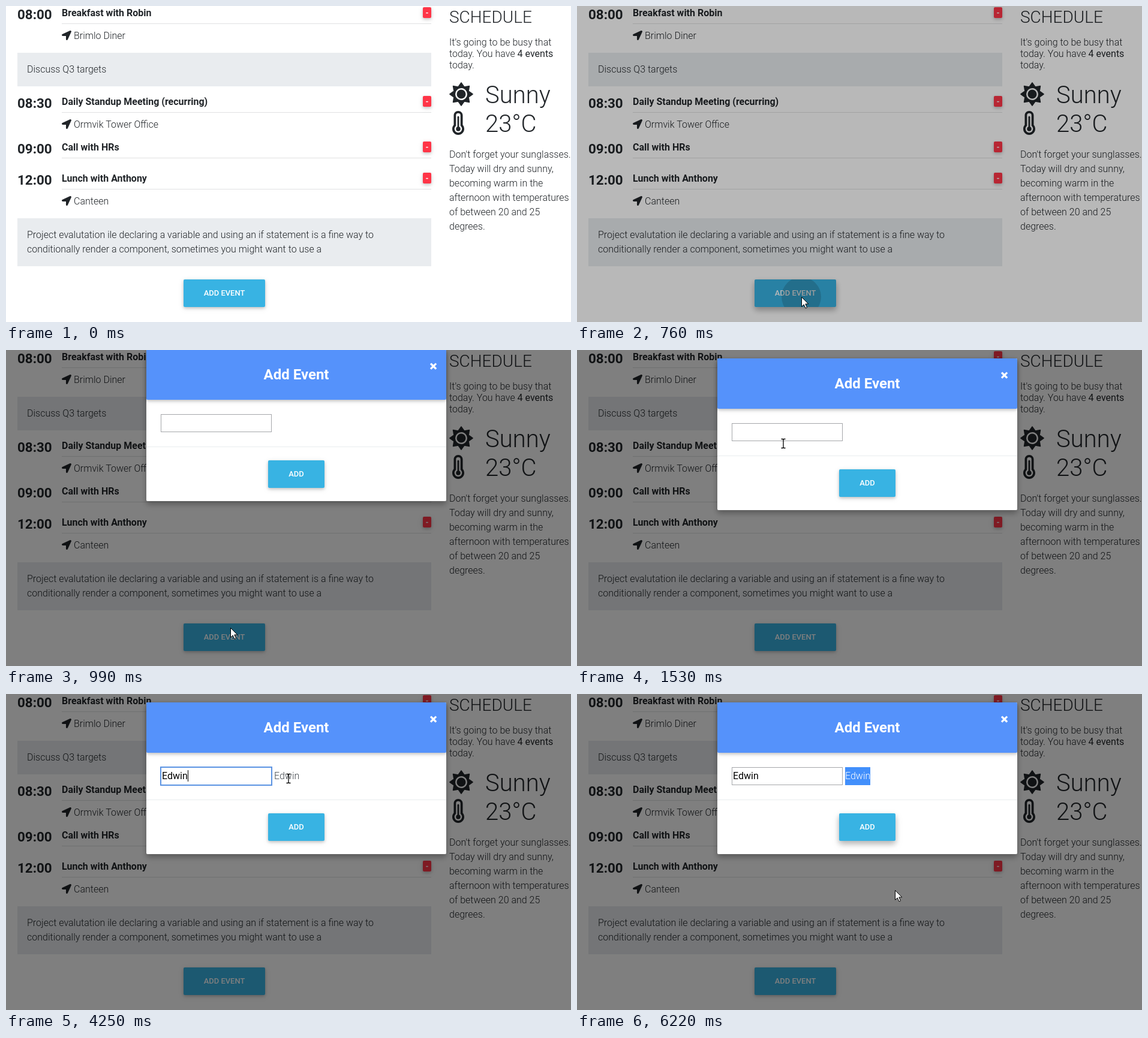
Write an HTML page that moves like this. It is 942 by 527 pixels and loops after 6450 ms.

```html
<!DOCTYPE html>
<html lang="en">
<head>
<meta charset="utf-8">
<title>Add event</title>
<style>
  html, body { margin: 0; width: 100%; height: 100%; overflow: hidden; background: #fff; }
  svg { display: block; width: 100%; height: 100%; }
  text { font: 300 16px Roboto, sans-serif; fill: #212529; }
  .bold { font-weight: 700; }
  .time { font-weight: 700; font-size: 22.4px; }
  .head { font-size: 28px; }
  .big { font-size: 40px; }
  .normal, .typed { font-weight: 400; }
  .typed { fill: #000; }
  .btn { font-weight: 500; font-size: 12.96px; fill: #fff; text-anchor: middle; }
  .title { font-weight: 700; font-size: 24px; fill: #fff; text-anchor: middle; }
  .minus { font-weight: 700; font-size: 13px; fill: #fff; text-anchor: middle; }
  .echo { fill: #40464c; }
</style>
</head>
<body>
<svg id="stage" viewBox="0 0 942 527" xmlns="http://www.w3.org/2000/svg">
  <defs>
    <filter id="low" x="-100%" y="-100%" width="300%" height="300%">
      <feDropShadow dx="0" dy="2" stdDeviation="2.5" flood-opacity=".18"/>
      <feDropShadow dx="0" dy="2" stdDeviation="4" flood-opacity=".1"/>
    </filter>
    <filter id="high" x="-50%" y="-100%" width="200%" height="300%">
      <feDropShadow dx="0" dy="5" stdDeviation="5" flood-opacity=".2"/>
      <feDropShadow dx="0" dy="4" stdDeviation="6" flood-opacity=".13"/>
    </filter>
    <clipPath id="addClip"><rect x="296" y="456" width="136" height="46" rx="2"/></clipPath>
    <path id="pin" d="M444.5 3.5L28.7 195.4c-48 22.4-32 92.8 19.2 92.8h175.9v175.9c0 51.2 70.4 67.2 92.8 19.2L508.5 67.5C524.5 29.1 482.9-12.5 444.5 3.5z" fill="#212529" transform="scale(.03125)"/>
  </defs>

  <g id="page">
    <rect width="942" height="527" fill="#fff"/>
    <rect x="19" y="78" width="690" height="56" fill="#e9ecef"/>
    <rect x="19" y="354" width="690" height="80" fill="#e9ecef"/>
    <rect id="openBtn" x="296" y="456" width="136" height="46" rx="2" fill="#39b3e3"/>
    <text class="btn" x="364" y="483">ADD EVENT</text>
    <circle id="ripple" cx="374" cy="485" clip-path="url(#addClip)"/>

    <g id="sun" transform="translate(759 147)"></g>
    <g transform="translate(744 175) scale(.078125)" fill="#212529" stroke-linecap="round">
      <path d="M224 96c0-53-43-96-96-96S32 43 32 96v203C12 322 0 352 0 384c0 71 57 128 128 128s128-57 128-128c0-32-12-62-32-85z"/>
      <path d="M128 96V384" stroke="#fff" stroke-width="96"/>
      <circle cx="128" cy="384" r="80" fill="#fff"/>
      <circle cx="128" cy="384" r="48"/>
      <path d="M128 130V384" stroke="#212529" stroke-width="36"/>
    </g>
  </g>

  <rect id="dim" width="942" height="527"/>

  <g id="modal">
    <rect x="234" y="14" width="500" height="253" rx="2" fill="#fff" filter="url(#high)"/>
    <rect x="234" y="14" width="500" height="84" rx="2" fill="#5592fb" filter="url(#low)"/>
    <text class="title" x="484" y="64">Add Event</text>
    <path d="M708.8 38.3l7.6 7.6m0-7.6l-7.6 7.6" stroke="#fff" stroke-width="3.6" stroke-linecap="square" transform="translate(712.6 42.1) scale(.9) translate(-712.6 -42.1)"/>
    <rect x="258.5" y="122.5" width="184" height="29" fill="#fff" stroke="#a5a7aa"/>
    <rect id="ring" x="258" y="122" width="185" height="30" fill="none" stroke="#5b93e2" stroke-width="2"/>
    <text id="typed" class="typed" x="260" y="142"></text>
    <rect id="caret" y="127" width="1" height="19"/>
    <rect id="mark" x="447" y="122" height="30" fill="#428ffb"/>
    <text class="echo" x="447" y="142" id="echo"><tspan id="picked" fill="#fff"></tspan><tspan id="rest"></tspan></text>
    <rect x="234" y="176" width="500" height="1" fill="#e9ecef"/>
    <rect id="addBtn" x="437" y="199" width="94" height="46" rx="2" fill="#39b3e3"/>
    <text class="btn" x="484" y="226">ADD</text>
  </g>

  <path id="arrow" d="M.5 .5V16.4l3.7-3.5 2.8 6.1 2.5-1.1-2.7-6h5z" fill="#fff" stroke="#000" stroke-width="1"/>
  <path id="beam" d="M-3.5 -7.5h2.5l1 1 1-1h2.5M0 -6.5V6.5M-3.5 7.5h2.5l1-1 1 1h2.5" fill="none" stroke="#000" stroke-width="1.3"/>
</svg>

<script>
const LOOP = 6450;
const NAME = "Edwin";
const NS = "http://www.w3.org/2000/svg";
const el = id => document.getElementById(id);
const page = el("page");

function add(parent, tag, attrs, content) {
  const node = document.createElementNS(NS, tag);
  for (const key in attrs) node.setAttribute(key, attrs[key]);
  if (content) node.textContent = content;
  parent.appendChild(node);
  return node;
}
const label = (x, y, content, cls = "") => add(page, "text", { x, y, class: cls }, content);
const lines = (x, y, gap, list) => list.forEach((s, i) => label(x, y + i * gap, s));

// Event list: title baseline, time, title, place
[
  [17, "08:00", "Breakfast with Robin", "Brimlo Diner"],
  [165, "08:30", "Daily Standup Meeting (recurring)", "Ormvik Tower Office"],
  [241, "09:00", "Call with HRs", ""],
  [293, "12:00", "Lunch with Anthony", "Canteen"]
].forEach(([y, time, title, place]) => {
  label(19, y + 5, time, "time");
  label(93, y, title, "bold");
  add(page, "rect", { x: 93, y: y + 12, width: 616, height: 1, fill: "#e0e1e2" });
  add(page, "rect", { x: 695, y: y - 15, width: 14, height: 18, rx: 2, fill: "#ff3547", filter: "url(#low)" });
  label(702, y - 1.5, "-", "minus");
  if (place) {
    add(page, "use", { href: "#pin", x: 0, y: 0, transform: `translate(93 ${y + 24})` });
    label(113, y + 38, place);
  }
});

lines(35, 111, 24, ["Discuss Q3 targets"]);
lines(35, 387, 24, [
  "Project evalutation ile declaring a variable and using an if statement is a fine way to",
  "conditionally render a component, sometimes you might want to use a"
]);
label(739, 28, "SCHEDULE", "head");
lines(739, 66, 19, ["It's going to be busy that", "today. You have ", "today."]);
const busy = [...page.querySelectorAll("text")].find(n => n.textContent.startsWith("today. You"));
busy.style.whiteSpace = "pre";
add(busy, "tspan", { class: "normal" }, "4 events");
label(799, 162, "Sunny", "big");
label(799, 210, "23°C", "big");
lines(739, 253, 24, [
  "Don't forget your sunglasses.", "Today will dry and sunny,", "becoming warm in the",
  "afternoon with temperatures", "of between 20 and 25", "degrees."
]);

const rays = Array.from({ length: 16 }, (_, i) => {
  const r = i % 2 ? 13 : 19, a = i * Math.PI / 8;
  return `${r * Math.cos(a)},${r * Math.sin(a)}`;
}).join(" ");
add(el("sun"), "polygon", { points: rays, fill: "#212529", stroke: "#212529", "stroke-width": 1.6, "stroke-linejoin": "round" });
add(el("sun"), "circle", { r: 10, fill: "#fff" });
add(el("sun"), "circle", { r: 7.5, fill: "#212529" });

// The picture only changes at these moments
const run = (from, to, n) => Array.from({ length: n }, (_, i) =>
  Math.round((from + (to - from) * i / (n - 1)) / 10) * 10);
const keys = [2450, 2620, 2770, 2920, 3090];
const cuts = [0, ...run(150, 760, 9), ...run(840, 1450, 9), ...run(1530, 1840, 5), 2220, ...keys,
  3550, ...run(3870, 4100, 4), ...run(4250, 4410, 3), ...run(4560, 5100, 8), 5250, 6220];

// Pointer path: time, x, y
const path = [
  [150, 500, 524], [600, 378, 488], [760, 374, 485], [840, 374, 465], [990, 374, 463],
  [1070, 372, 440], [1380, 346, 180], [1450, 344, 160], [1840, 342, 139], [3790, 342, 139],
  [4100, 492, 142], [4250, 471, 141], [4410, 448, 141], [4560, 447, 141], [4950, 505, 138],
  [5020, 508, 134], [5100, 492, 123], [5250, 504, 128], [6220, 530, 327]
];

const clamp = v => Math.min(1, Math.max(0, v));
const within = (t, a, b) => t >= a && t < b;
const set = (id, attrs) => { for (const k in attrs) el(id).setAttribute(k, attrs[k]); };
const show = (id, on) => set(id, { visibility: on ? "visible" : "hidden" });

function pointerAt(t) {
  const i = path.findIndex(p => p[0] >= t);
  if (i <= 0) return path[0].slice(1);
  const [a, b] = [path[i - 1], path[i]];
  const k = (t - a[0]) / (b[0] - a[0]);
  return [a[1] + (b[1] - a[1]) * k, a[2] + (b[2] - a[2]) * k];
}

function draw(time) {
  const t = cuts.filter(c => c <= time).pop();
  const [x, y] = pointerAt(t);

  set("dim", { opacity: 0.5 * clamp((t - 676) / 150) });
  set("openBtn", { filter: within(t, 530, 840) ? "url(#high)" : "url(#low)" });
  show("ripple", within(t, 690, 990));
  set("ripple", { r: Math.max(0, 33 + (t - 760) * 0.36), opacity: 0.15 * clamp((990 - t) / 200) });

  const drop = -61 * Math.pow(1 - clamp((t - 810) / 300), 1.5);
  show("modal", t > 810);
  set("modal", { transform: `translate(0 ${Math.round(drop)})`, opacity: clamp((t - 810) / 150) });
  set("addBtn", { filter: t >= 6220 ? "url(#high)" : "url(#low)" });

  const focused = within(t, 1680, 4640);
  const text = NAME.slice(0, keys.filter(k => k <= t).length);
  const typed = el("typed");
  typed.textContent = text;
  const width = text ? typed.getComputedTextLength() : 0;
  set("caret", { x: Math.round(260 + width) });
  const blink = within(t, 2220, 2450) || within(t, 3550, 4020);
  el("ring").style.display = focused ? "" : "none";
  el("caret").style.display = focused && !blink ? "" : "none";

  // Selection follows the drag, letter by letter
  const echo = el("echo");
  el("picked").textContent = "";
  el("rest").textContent = text;
  let count = 0, marked = 0;
  if (t >= 5020) count = text.length;
  else if (t >= 4640) {
    while (count < text.length && 447 + echo.getSubStringLength(0, count + 1) - 4 < x) count++;
  }
  if (count) marked = echo.getSubStringLength(0, count);
  el("picked").textContent = text.slice(0, count);
  el("rest").textContent = text.slice(count);
  set("mark", { width: Math.round(marked) });

  const beam = within(t, 1450, 4100) || within(t, 4250, 5100);
  const at = { transform: `translate(${Math.round(x)} ${Math.round(y)})` };
  set("arrow", at);
  set("beam", at);
  show("arrow", t >= 150 && !beam);
  show("beam", beam);
}

const start = performance.now();
function tick() {
  draw((performance.now() - start) % LOOP);
  requestAnimationFrame(tick);
}
tick();
</script>
</body>
</html>
```
